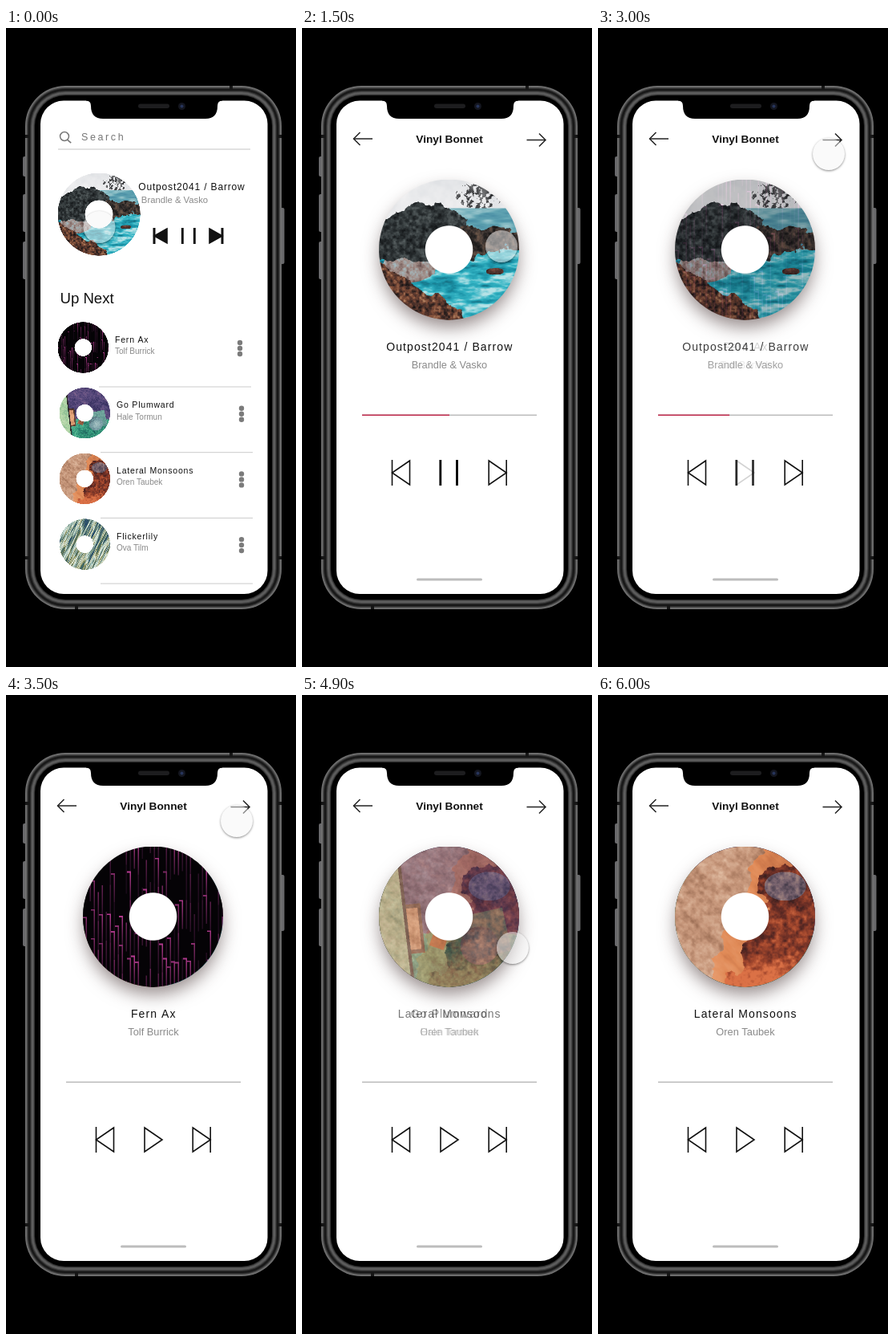
Write an HTML page with a canvas that moves like this. It is 362 by 796 pixels and loops after 6100 ms.

```html
<!DOCTYPE html>
<html lang="en">
<head>
<meta charset="utf-8">
<title>Music player</title>
<style>
html, body { margin: 0; width: 100%; height: 100%; overflow: hidden; background: #000; }
canvas { display: block; width: 362px; height: 796px; }
</style>
</head>
<body>
<canvas id="stage" width="362" height="796"></canvas>
<script>
const LOOP = 6100, STEP = 100, R = 87.5;
const c = document.getElementById('stage').getContext('2d');
const clamp = v => Math.max(0, Math.min(1, v));
const mix = (a, b, p) => a + (b - a) * p;
const smooth = u => u * u * (3 - 2 * u);

// ---------- procedural album art ----------
function hash(x, y) {
  const s = Math.sin(x * 127.1 + y * 311.7) * 43758.5453;
  return s - Math.floor(s);
}
function noise(x, y) {
  const i = Math.floor(x), j = Math.floor(y), u = smooth(x - i), v = smooth(y - j);
  return mix(mix(hash(i, j), hash(i + 1, j), u), mix(hash(i, j + 1), hash(i + 1, j + 1), u), v);
}
// Layered noise, about 0..1; size is the width of the largest blobs.
function cloud(x, y, size) {
  let sum = 0;
  for (let k = 0; k < 4; k++) sum += noise(x * 2 ** k / size + 9 * k, y * 2 ** k / size) / 2 ** (k + 1);
  return clamp((sum - 0.47) * 1.7 + 0.5);
}
// Colour at v (0..1) along a row of 0xrrggbb stops.
function ramp(v, ...stops) {
  const at = clamp(v) * (stops.length - 1), i = Math.min(Math.floor(at), stops.length - 2);
  return [16, 8, 0].map(s => mix(stops[i] >> s & 255, stops[i + 1] >> s & 255, at - i));
}
const inOval = (x, y, cx, cy, rx, ry) => Math.hypot((x - cx) / rx, (y - cy) / ry) < 1;
const inBlock = (x, y, cx, cy, w, h, tilt) =>
  Math.abs(x - cx - (y - cy) * tilt) < w && Math.abs(y - cy + (x - cx) * tilt) < h;

// Each painter gives the colour at (x, y); the disc centre is (0, 0).
function coast(x, y) {
  const n = cloud(x, y, 14), fine = cloud(x, y, 4), rough = 16 * (n - 0.5);
  if (y > 14 + (x + 88) * 0.62 + rough) return ramp(fine, 0x171414, 0x49302a, 0x7c4a36, 0xb58563);
  if (inOval(x, y, 57, 27, 11, 4 + rough / 4)) return ramp(fine, 0x2a1e1e, 0x7e4c40);
  if (x > 14 && y < 2 + rough + 5 * Math.sin(x / 14) && y > -23 + rough) return ramp(fine, 0x151515, 0x3d3532, 0x71594a);
  if (x < 28 + rough && y > -62 + (x + 30) ** 2 / 100 + rough && y < 12 + rough / 2) return ramp(fine, 0x15181a, 0x303638, 0x555d5e);
  if (inOval(x, y, -52, 22, 32 + rough, 19)) return ramp(fine, 0x6a5351, 0xa18c86, 0xa4bac0);
  if (y > 0) return ramp(cloud(x / 3, y, 5) + 0.003 * y, 0x155f70, 0x1b93a8, 0x35b5c5, 0xb5e2e6);
  if (y > -52 && x > 0) return ramp(cloud(x / 4, y, 6), 0x4387a0, 0x62a5b3, 0x9cc7cd);
  return inOval(x, y, 38, -68, 30, 17) && fine > 0.56 ? ramp(n, 0x252628, 0x77787a) : ramp(n, 0xe0e2e5, 0xf0f0f1);
}
function neon(x, y) {
  const col = Math.floor((x + R) / 5), shift = y + 60 * hash(col, 3), row = Math.floor(shift / 36);
  const glow = hash(col, row), along = shift / 36 - row, across = (x + R) / 5 - col;
  if (glow < 0.35) return [5, 3, 6];
  const lit = across > 0.65 || (glow > 0.75 && along < 0.05);
  return lit ? ramp((glow - 0.35) * (1.4 - along), 0x180a18, 0x6b2456, 0xd043a6) : [5, 3, 6];
}
function still(x, y) {
  const n = cloud(x, y, 16), fine = cloud(x, y, 3), v = (n + fine) / 2;
  const ball = Math.hypot(x - 38, y - 36) / 24;
  if (ball < 1) return ramp(0.8 - ball * 0.6 + Math.hypot(x - 30, y - 28) / 110 + (fine - 0.5) * 0.3, 0x24323e, 0x7298a0, 0xb9d2d0);
  const edge = x + 64 - (y + 60) * 0.12;
  if (edge < 0) return ramp(v, 0x77b08e, 0xacd2a2, 0xd3e5c4);
  if (edge < 4) return [45, 40, 42];
  if (inBlock(x, y, -45, 15, 8, 26, 0.1)) return ramp(v + 0.2, 0xa35d3e, 0xf0b386);
  if (inBlock(x, y, -45, 15, 12, 31, 0.1)) return ramp(v, 0x3c2824, 0x7f513e);
  if (inBlock(x, y, -12, 27, 10, 13, -0.35)) return ramp(v, 0x613a30, 0xbc7650);
  if (inBlock(x, y, 50, 20, 23, 28, 0.22)) return ramp(v, 0x467b7b, 0x84b9ac);
  return y > 12 + 14 * n ? ramp(v, 0x164b50, 0x369b7d, 0x7ad7aa) : ramp(v, 0x262450, 0x57497c, 0x8a6b91);
}
function desert(x, y) {
  const n = cloud(x, y, 20), fine = cloud(x, y, 5), rough = 60 * (n - 0.5);
  if (y > -58 + rough / 3 && x > 26 - 0.3 * (y + 40) + rough) {
    if (inOval(x, y, 50, -38, 26, 18)) return ramp(fine, 0x453c4a, 0x75606c, 0xa1847f);
    return ramp(fine * 0.6 + n * 0.3 + clamp((y - 40) / 60), 0x2d1c1e, 0x672d25, 0xa2472d, 0xdb7146);
  }
  const streak = cloud((x + y) / 4, x - y, 12);
  if (x < -20 - 0.45 * y + rough / 2) return ramp((streak + fine) / 2, 0x95684f, 0xc6967a, 0xe3c0a6);
  return ramp((streak + n) / 2, 0xb8653e, 0xe08a57, 0xe9a073);
}
const brush = (x, y) => ramp((cloud(x * 2 + y, (y - 2 * x) / 10, 9) - 0.5) * 1.3 + 0.5,
  0x294d6a, 0x6e8b73, 0xa8c7c4, 0xe8eddd, 0x8c9059, 0x3f6565);

function makeArt(paint) {
  const canvas = document.createElement('canvas'), size = canvas.width = canvas.height = R * 4;
  const g = canvas.getContext('2d'), image = g.createImageData(size, size);
  for (let i = 0; i < size * size; i++) {
    image.data.set([...paint((i % size) / 2 - R, Math.floor(i / size) / 2 - R), 255], i * 4);
  }
  g.putImageData(image, 0, 0);
  g.globalCompositeOperation = 'destination-in';
  oval(g, '#000', 2 * R, 2 * R, 2 * R);
  g.globalCompositeOperation = 'source-over';
  oval(g, '#fff', 2 * R, 2 * R, 59.5);
  return canvas;
}

// ---------- drawing helpers ----------
function oval(g, color, x, y, rx, ry = rx) {
  g.fillStyle = color;
  g.beginPath();
  g.ellipse(x, y, rx, ry, 0, 0, 7);
  g.fill();
}
function faded(alpha, draw) {
  if (alpha <= 0) return;
  c.save();
  c.globalAlpha *= alpha;
  draw();
  c.restore();
}
function box(color, x, y, w, h, r = 0) {
  c.fillStyle = color;
  c.beginPath();
  c.roundRect(x, y, w, h, r);
  c.fill();
}
function line(color, width, ...p) {
  c.strokeStyle = color;
  c.lineWidth = width;
  c.beginPath();
  for (let i = 0; i < p.length; i += 2) c.lineTo(p[i], p[i + 1]);
  c.stroke();
}
function text(str, x, y, size, color, spacing = 0, align = 'left', weight = '') {
  c.font = `${weight} ${size}px "Liberation Sans", sans-serif`;
  c.letterSpacing = spacing + 'px';
  c.textAlign = align;
  c.fillStyle = color;
  c.fillText(str, x + (align === 'center' ? spacing / 2 : 0), y);
}
function disc(art, x, y, r) {
  c.drawImage(art, x - r, y - r, 2 * r, 2 * r);
}
// Triangle pointing in direction dir; fill is the opacity of its inside.
function triangle(x, y, w, h, dir, fill = 0) {
  const a = x - dir * w / 2;
  c.beginPath();
  c.moveTo(a, y - h / 2);
  c.lineTo(x + dir * w / 2, y);
  c.lineTo(a, y + h / 2);
  c.closePath();
  c.strokeStyle = c.fillStyle = '#111';
  c.lineWidth = 1.6;
  c.stroke();
  faded(fill, () => c.fill());
}
function skip(x, y, w, h, dir, fill = 0) {
  const b = x + dir * w / 2;
  triangle(x, y, w, h - 2, dir, fill);
  line('#111', mix(1.6, 3, fill), b, y - h / 2, b, y + h / 2);
}

const tracks = [
  ['Outpost2041 / Barrow', 'Brandle & Vasko', coast],
  ['Fern Ax', 'Tolf Burrick', neon],
  ['Go Plumward', 'Hale Tormun', still],
  ['Lateral Monsoons', 'Oren Taubek', desert],
  ['Flickerlily', 'Ova Tilm', brush]
].map(([title, artist, paint]) => ({ title, artist, art: makeArt(paint) }));

// ---------- phone ----------
function phone() {
  box('#000', 0, 0, 362, 796);
  for (const [y, h] of [[160, 25], [207, 47], [266, 47]]) box('#69696b', 21, y, 5, h, 2);
  box('#69696b', 342.5, 224, 5, 70, 2);
  for (let d = 0; d < 12; d++) {
    const shade = 72 + 42 * Math.cos(d * 0.72) - 2 * d;
    box(`rgb(${shade},${shade},${shade})`, 24 + d, 72 + d, 320 - 2 * d, 652 - 2 * d, 50 - d);
  }
  box('#000', 36, 84, 296, 628, 38);
  for (const y of [133, 658]) for (const x of [24, 339]) box('#161616', x, y, 5, 4);
  box('#161616', 279, 72, 4, 5);
  box('#161616', 86, 719, 4, 5);
  box('#fff', 43, 90.5, 283.5, 614.5, 29);
}
function notch() {
  c.fillStyle = '#000';
  c.beginPath();
  for (const side of [-1, 1]) {
    const at = x => 185 + side * x;
    c.moveTo(185, 89);
    c.lineTo(at(85), 89);
    c.lineTo(at(85), 90.5);
    c.quadraticCurveTo(at(79), 90.5, at(79), 97);
    c.quadraticCurveTo(at(79), 113, at(64), 113);
    c.lineTo(185, 113);
  }
  c.fill();
  box('#1d1d1f', 165, 94.5, 39, 5.5, 3);
  oval(c, '#14161f', 219.5, 97.5, 4.5);
  oval(c, '#26345a', 219.5, 97.5, 2);
}

// ---------- screens ----------
function list() {
  text('Search', 94, 140, 12.5, '#777', 2.6);
  line('#c4c4c4', 1, 65, 151, 305, 151);
  skip(193, 259, 16, 20, -1, 1);
  text('Up Next', 67.5, 342.5, 18.6, '#111');
  tracks.slice(1).forEach((track, i) => {
    const dx = i ? 2 : 0, y = 398 + i * 81.7;
    disc(track.art, 96.3 + dx, y, 31.7);
    text(track.title, 136 + dx, y - 6.5, 10.5, '#111', 0.8);
    text(track.artist, 136 + dx, y + 8, 10, '#8a8a8a');
    for (const k of [-6, 1, 8]) oval(c, '#7b7b7b', 292 + dx, y + k, 3.2);
    line('#cbcbcb', 1, 116 + dx, y + 49, 306 + dx, y + 49);
  });
}
function header() {
  text('Vinyl Bonnet', 184, 143, 13.7, '#111', 0, 'center', 'bold');
  for (const [tip, dir, y] of [[64.5, 1, 138], [304, -1, 139.5]]) {
    line('#222', 1.5, tip, y, tip + dir * 23.5, y);
    line('#222', 1.5, tip + dir * 8, y - 8, tip, y, tip + dir * 8, y + 8);
  }
}
// Search glass that grows into the left control, with an uneven rim.
function glass(p) {
  const x = mix(73, 122, p), y = mix(135, 550, p), rx = mix(6.2, 11, p), ry = mix(6.2, 15.5, p);
  c.fillStyle = p < 0.5 ? '#777' : '#000';
  c.beginPath();
  c.ellipse(x, y, rx, ry, 0, 0, 7);
  c.ellipse(x, y, rx - mix(1.5, 2.4, p), ry - 1.5, -0.15 * p, 0, 7);
  c.fill('evenodd');
  line(c.fillStyle, mix(1.6, 2.4, p), x + rx * 0.6, y + ry * 0.7, x + rx + 2, y + ry + 2);
}
function pauseBars(p) {
  const top = mix(249, 538, p), h = mix(20, 32, p);
  for (const x of [mix(220.3, 172.8, p), mix(235.3, 193.5, p)]) {
    if (p > 0 && p < 1) oval(c, '#000', x, top + h / 2, 1.7, h / 2);
    else box('#000', x - 1.4, top, 2.8, h);
  }
}

// ---------- timeline ----------
const pathKeys = [
  [0, 116.5, 248], [700, 116, 240], [1500, 249, 272], [2300, 241, 272], [2800, 288, 157],
  [3500, 288, 157], [4300, 301, 170], [4900, 263, 315], [LOOP, 263, 315]
];
function cursor(t) {
  const i = pathKeys.findIndex(key => t < key[0]);
  const [t0, x0, y0] = pathKeys[i - 1], [t1, x1, y1] = pathKeys[i];
  const u = smooth((t - t0) / (t1 - t0)), x = mix(x0, x1, u), y = mix(y0, y1, u);
  faded(clamp((5400 - t) / 500), () => {
    oval(c, 'rgba(245,245,245,.5)', x, y, 20);
    // Keep the shadow outside the translucent face.
    c.beginPath();
    c.rect(x - 40, y - 40, 80, 80);
    c.arc(x, y, 20, 0, 7);
    c.clip('evenodd');
    c.shadowColor = 'rgba(0,0,0,.55)';
    c.shadowBlur = 3;
    c.shadowOffsetY = 1;
    oval(c, '#fff', x, y, 19.7);
  });
}

function draw(t) {
  const p = 1 - (1 - clamp((t - 50) / 650)) ** 3, open = p === 1;
  const fades = [0, 1, 2].map(i => smooth(clamp((t - 2850 - 875 * i) / 550)));

  phone();
  faded(1 - p, list);
  faded(p, header);

  const x = mix(116, 183.5, p), y = mix(232, 276, p), r = mix(51.5, R, p);
  faded(p, () => {
    c.shadowColor = 'rgba(60,40,40,.55)';
    c.shadowBlur = 22;
    c.shadowOffsetY = 11;
    oval(c, '#fff', x, y, r - 2);
  });
  disc(tracks[0].art, x, y, r);
  fades.forEach((f, i) => faded(f, () => disc(tracks[i + 1].art, x, y, r)));

  tracks.slice(0, 4).forEach((track, i) => {
    const shown = (i ? fades[i - 1] : 1) * (1 - (fades[i] || 0));
    faded(shown, () => {
      text(track.title, mix(231.5, 183.7, p), mix(202, 402, p), mix(12, 14, p), '#111', mix(0.83, 1.1, p), 'center');
      text(track.artist, mix(210.5, 184, p), mix(218, 424, p), mix(11.3, 12.8, p), '#8a8a8a', 0, 'center');
    });
  });

  faded(p, () => {
    line('#bcbcbc', 1.5, 75, 482.3, 293, 482.3);
    if (fades[0] < 1) line('#c02a4c', 1.5, 75, 482.3, mix(184, 75, fades[0]), 482.3);
    box('#bdbdbd', 143, open ? 685.5 : 683, 82, 3, 1.5);
  });

  if (open) skip(123.5, 554, 22, 32, -1);
  else glass(p);
  // The right control settles with a small jump once the screen is open.
  skip(mix(262, open ? 244.2 : 231, p), mix(259, 554, p), mix(16, 22, p), mix(20, 32, p), 1, 1 - p);
  faded(1 - fades[0], () => pauseBars(p));
  faded(fades[0], () => triangle(184, 554, 22, 30, 1));

  cursor(t);
  notch();
}

function tick() {
  const t = performance.now() % LOOP;
  draw(Math.floor(t / STEP) * STEP);
  requestAnimationFrame(tick);
}
tick();
</script>
</body>
</html>
```
